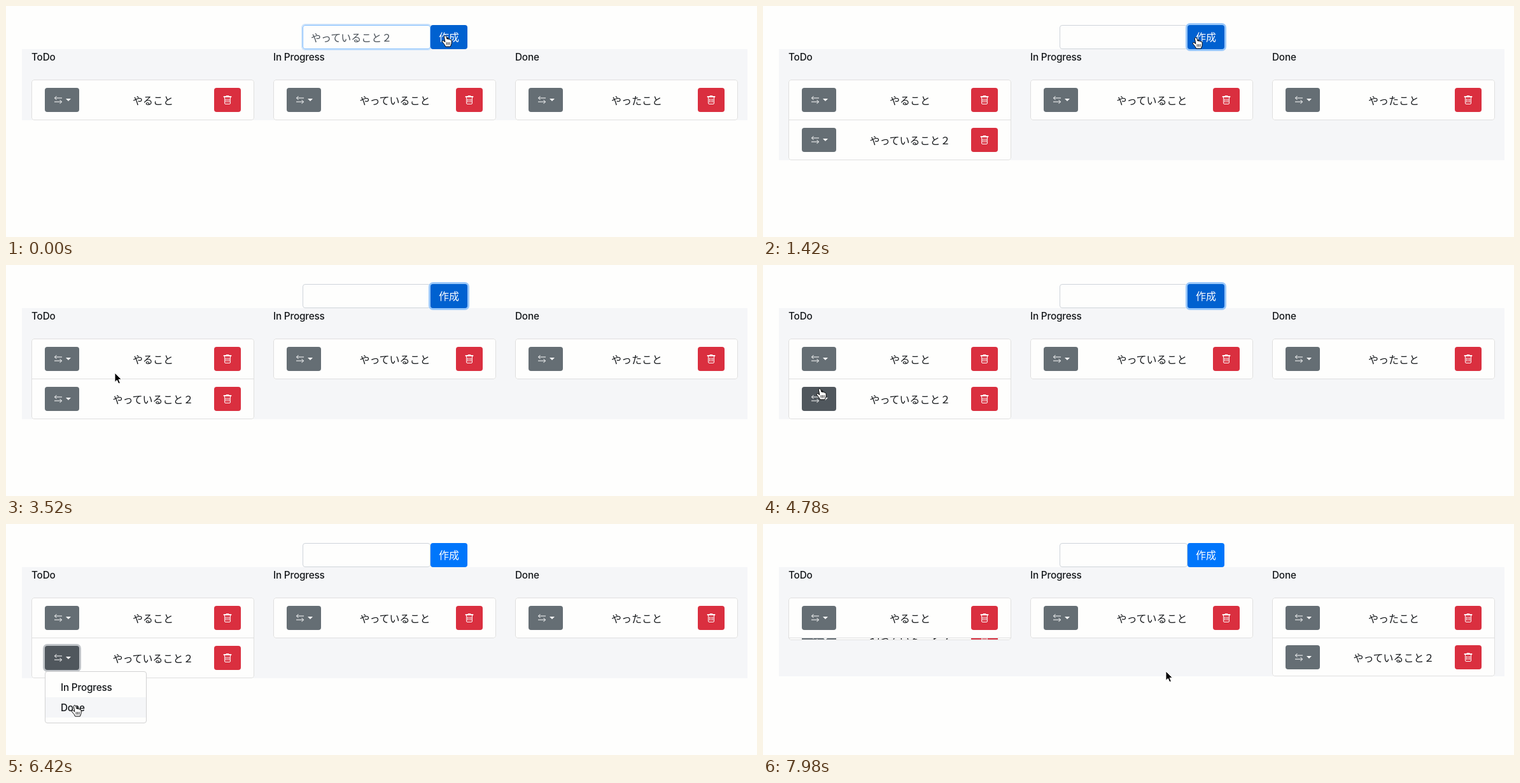
Animation of 1180 by 364 pixels, one loop 8000 ms. Source, as an HTML page:

```html
<!DOCTYPE html>
<html lang="ja">
<head>
<meta charset="utf-8">
<title>Kanban board</title>
<style>
  * { box-sizing: border-box; }
  html, body { margin: 0; width: 100%; height: 100%; overflow: hidden; background: #fefefd; }
  body { position: relative; color: #15181b; font: 16px/24px "Noto Sans CJK JP", "Noto Sans CJK", sans-serif; }
  div, svg { position: absolute; }
  .latin { font: 500 15.3px/24px Inter, sans-serif; letter-spacing: -.2px; white-space: nowrap; }
  .col { top: 68px; width: 380px; background: #f5f6f8; }
  .col > .latin { left: 15px; top: 1px; }
  .list { left: 15px; top: 48px; width: 350px; border-radius: 4px; background: #fefefd; overflow: hidden; }
  .frame { inset: 0; border: 1px solid #dfdfdf; border-radius: 4px; }
  .slot { left: 0; width: 100%; overflow: hidden; }
  .line { top: 63px; width: 100%; height: 1px; background: #dfdfdf; }
  .item { left: 0; top: 50%; width: 100%; height: 38px; margin-top: -19px; }
  .second .item { margin-top: -19.5px; }
  .item span { position: absolute; left: 75px; width: 232px; top: 7px; text-align: center; white-space: nowrap; }
  .btn { top: 0; height: 38px; border-radius: 4px; }
  .move { left: 21px; width: 54px; background: #656e74; }
  .move.on { background: #50575d; }
  .move.ring { box-shadow: 0 0 0 3px #c0c4c8; }
  .del { left: 287px; width: 42px; background: #da2f3f; }
  .btn svg { left: 13px; top: 11px; fill: none; stroke: #fff; }
  .caret { left: 33px; top: 17px; border: 4.8px solid transparent; border-top-color: #fff; border-bottom: 0; }
  #input { left: 466px; top: 30px; width: 201px; height: 38px; padding: 6px 12px; border: 1px solid #ced4da; border-radius: 4px; color: #495057; }
  #input.focus { border-color: #80bdff; box-shadow: 0 0 0 2px #cfe4fa; }
  #create { left: 667px; top: 30px; width: 58px; padding: 6px 0; text-align: center; color: #fff; background: #0076fb; }
  #create.on { background: #0061d0; }
  #create.ring { box-shadow: 0 0 0 3px #9ac8fa; }
  #menu { left: 61px; top: 232px; width: 160px; height: 82px; padding: 8px 0; background: #fefefd; border: 1px solid #d2d2d2; border-radius: 4px; }
  #menu div { position: static; height: 32px; padding: 5px 24px 3px; }
  #menu .on { background: #f5f6f8; }
  #cursor { left: 0; top: 0; overflow: visible; }
</style>
</head>
<body>
<div id="input"></div>
<div id="create" class="btn">作成</div>
<div id="menu" class="latin"><div>In Progress</div><div>Done</div></div>
<svg id="cursor" width="20" height="22">
  <path id="arrow" d="M0 0V14.5L3.4 11.4 5.8 17 8.4 15.9 6 10.4H10.4Z" fill="#000" stroke="#fff" stroke-width="1"/>
  <g id="hand" stroke="#000" stroke-linejoin="round" stroke-linecap="round">
    <path d="M-1.6 1.2Q-1.2-1 .7-.2 1.6.3 3.1 5.2 5-.1 4.4 5.3 7.1 4.2 7.2 6 9.8 5.3 10.2 8 10.7 12.3 8.4 17H.6Q-.5 13.6-4.4 9.8-5.6 8.2-4 7.6-2.6 7.2-.4 9.4Z" fill="#fff"/>
    <path d="M2.2 10.5V14M4.6 10.5V14M7 10.5V14" fill="none" stroke-width=".9"/>
  </g>
</svg>
<script>
const LOOP = 8000, CLEAR = 20, ADD = 40, OPEN = 5060, CLOSE = 7160, MOVE = 7205, SLIDE = 1060, ROW = 63;
const $ = id => document.getElementById(id);
const toggle = (el, name, on) => el.classList.toggle(name, on);

const icon = d => `<svg width="16" height="16"><path d="${d}"/></svg>`;
const swap = icon("M5.5 2l-3 3 3 3M2.5 5H14M10.5 8l3 3-3 3M13.5 11H2");
const trash = icon("M5.5 6v6M8 6v6M10.5 6v6M3.5 4v9q0 1.5 1.5 1.5h6q1.5 0 1.5-1.5V4M2 2.5H14v1H2zM6 2V1.5h4V2");
const item = text => `<div class="item"><div class="btn move">${swap}<div class="caret"></div></div>
  <span>${text}</span><div class="btn del">${trash}</div></div>`;

const extra = "やっていること２";
const cols = [["ToDo", "やること"], ["In Progress", "やっていること"], ["Done", "やったこと"]].map(([title, task], i) => {
  const col = document.createElement("div");
  col.className = "col";
  col.style.left = 25 + 380 * i + "px";
  col.innerHTML = `<div class="latin">${title}</div><div class="list">
    <div class="slot" style="top:0;height:64px">${item(task)}</div>
    <div class="slot second" style="top:64px">${item(extra)}</div>
    <div class="line"></div><div class="frame"></div></div>`;
  document.body.prepend(col);
  const find = s => col.querySelector(s);
  return { col, list: find(".list"), second: find(".second"), line: find(".line") };
});
const moveBtn = cols[0].second.querySelector(".move");
const options = $("menu").children;

// cubic-bezier(.25, .1, .25, 1)
function ease(x) {
  if (x <= 0 || x >= 1) return x <= 0 ? 0 : 1;
  const bez = (a, b, s) => 3 * (1 - s) * s * ((1 - s) * a + s * b) + s ** 3;
  let lo = 0, hi = 1;
  for (let i = 0; i < 20; i++) {
    const mid = (lo + hi) / 2;
    if (bez(.25, .25, mid) < x) lo = mid; else hi = mid;
  }
  return bez(.1, 1, lo);
}

// time, x, y of the pointer tip
const path = [
  [0, 690, 47], [700, 690, 47], [1400, 680, 50], [1660, 680, 50], [2380, 420, 90], [2920, 420, 90],
  [3520, 171, 170], [4440, 89, 195], [5440, 89, 195], [6400, 108, 286], [7120, 108, 286],
  [7200, 108, 285], [7460, 108, 285], [8000, 635, 232]
];
function pointer(t) {
  const i = path.findIndex(p => p[0] > t);
  const [t0, x0, y0] = path[i - 1], [t1, x1, y1] = path[i];
  const u = (t - t0) / (t1 - t0), k = u * u * (3 - 2 * u);
  return [x0 + (x1 - x0) * k, y0 + (y1 - y0) * k];
}

function draw(t) {
  const [x, y] = pointer(t);
  const over = (l, top, r, b) => x >= l && x < r && y >= top && y < b;
  const open = t >= OPEN && t < CLOSE;
  const moved = ease((t - MOVE) / SLIDE);
  const rows = [ROW * (ease((t - ADD) / SLIDE) - moved), 0, ROW * moved];
  const tallest = Math.max(...rows);

  cols.forEach((c, i) => {
    c.col.style.height = 112 + tallest + "px";
    c.list.style.height = 64 + rows[i] + "px";
    c.second.style.height = rows[i] + "px";
    c.line.style.display = rows[i] > .5 ? "" : "none";
  });

  const typing = t < CLEAR, focused = !typing && t < OPEN;
  $("input").textContent = typing ? extra : "";
  toggle($("input"), "focus", typing);
  const onCreate = over(667, 30, 725, 68);
  toggle($("create"), "on", onCreate || focused);
  toggle($("create"), "ring", focused);

  const onMove = t < CLOSE && over(61, 192, 115, 230);
  toggle(moveBtn, "on", onMove || open);
  toggle(moveBtn, "ring", open);

  $("menu").style.display = open ? "" : "none";
  const onOption = [0, 1].map(i => open && over(62, 241 + 32 * i, 220, 273 + 32 * i));
  onOption.forEach((on, i) => toggle(options[i], "on", on));

  const hand = onCreate || onMove || onOption.includes(true);
  $("hand").style.display = hand ? "" : "none";
  $("arrow").style.display = hand ? "none" : "";
  $("cursor").style.transform = `translate(${Math.round(x)}px, ${Math.round(y)}px)`;
}

const start = performance.now();
function tick() {
  draw((performance.now() - start) % LOOP);
  requestAnimationFrame(tick);
}
tick();
</script>
</body>
</html>
```
